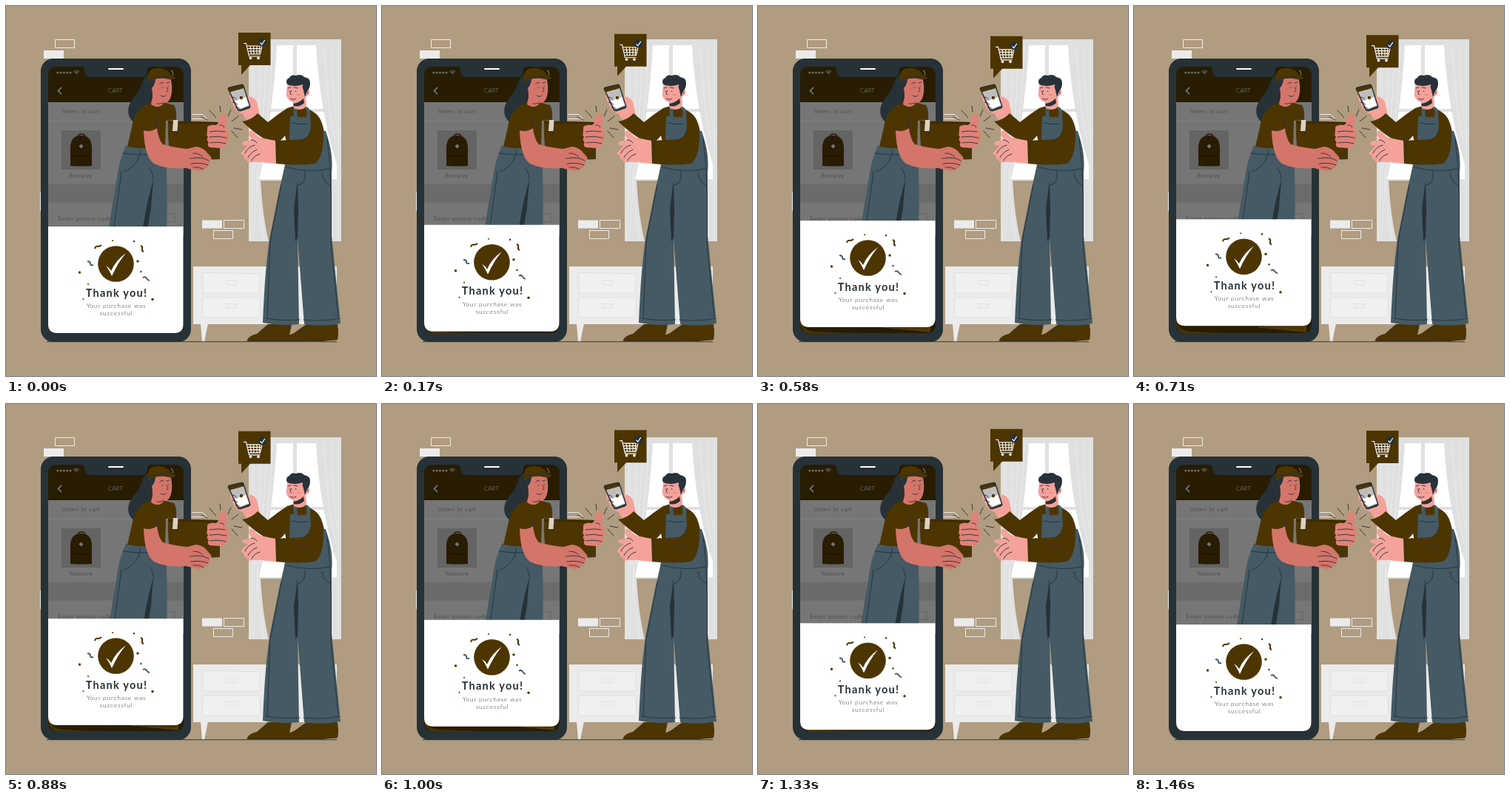
Recreate the animation shown at these times as an HTML page. Size 500 px wide and 500 px high, loop 1.5 s.

```html
<!DOCTYPE html>
<html lang="en">
<head>
<meta charset="utf-8">
<title>Purchase complete</title>
<style>
  html, body { margin: 0; height: 100%; overflow: hidden; background: #b09c80; }
  svg { display: block; width: 100vw; height: 100vh; }
  text { font-family: Lato, "Open Sans", sans-serif; font-weight: 300; fill: #263238; }
  .mid { text-anchor: middle; }
  .dark { fill: #263238; }
  .brown { fill: #4d3502; }
  .shade { fill: #281c02; }
  .denim { fill: #455a64; }
  .pale { fill: #ebebeb; }
  .skin { fill: #d4756a; }
  .pink { fill: #f4a29a; }
  .line { fill: none; stroke: #263238; stroke-width: .9; stroke-linecap: round; stroke-linejoin: round; }
  .light { fill: none; stroke: #ebebeb; stroke-width: 1; }
  .fold { fill: none; stroke: #eee; stroke-width: .8; }
  .trim { fill: #f0f0f0; stroke: #dcdcdc; stroke-width: .8; }
</style>
</head>
<body>
<svg viewBox="0 0 500 500">
  <rect width="500" height="500" fill="#b09c80"/>

  <!-- bricks -->
  <path class="pale" d="M51 60h27v11H51zM265 289.500h27v11h-27z"/>
  <path class="light" d="M66.500 45.500h26v11h-26zM294.500 289.500h27v11h-27zM280.500 303.500h26v11h-26zM251 146.500h15l5 6h-20"/>

  <!-- window -->
  <path fill="#e0e0e0" d="M328 45h125v273h-33V236h-76q3 50 11 82h-27z"/>
  <path fill="#fff" d="M366 53h53q5 90 28 160v21H342q18-80 24-181z"/>
  <path fill="#e0e0e0" d="M388 53h5v181h-5zM357 139h75v4h-75z"/>
  <path class="fold" d="M333 53q4 150-3 264M343 53q1 140-9 264M352 53q-2 110-18 170M360 53q-4 110-20 175 1 50 9 89M430 53q3 80 17 140M440 53q1 80 10 130M449 53v264"/>

  <!-- cabinet -->
  <path class="pale" d="M253 352h194v78H253zM263 429h10l-5 25h-3z"/>
  <path class="trim" d="M265.500 360l78 2-1 26h-76zM266 394h77l1 27h-79zM298 371h13v5.500h-13zM298 402.500h13v5.500h-13z"/>
  <path class="line" d="M55 453.700h392"/>

  <!-- large phone -->
  <rect class="dark" x="47" y="71" width="203" height="383" rx="17"/>
  <path class="light" d="M46.500 252v25"/>
  <path fill="#767676" d="M57 130h183v180H57z"/>
  <path fill="#6b6b6b" d="M57 240.500h183v25H57z"/>
  <path fill="#646464" d="M75 168h53v53H75z"/>
  <path fill="#808080" d="M57 155h183v1H57z"/>
  <path class="shade" d="M57 130V94q0-12 12-12h33q4 0 4 5 1 9 9 9h68q8 0 8-9 0-5 4-5h33q12 0 12 12v36z"/>
  <path d="M139 85h19" stroke="#fff" stroke-width="2" stroke-linecap="round"/>
  <path d="M70 90.200h17" stroke="#757575" stroke-width="2.800" stroke-dasharray="0 4.200" stroke-linecap="round"/>
  <path d="M91.500 89q3.500-3 7 0M93 90.600q2-1.600 4 0M94.800 92h.5M223 87q4 3 2 7" fill="none" stroke="#757575" stroke-width="1.200"/>
  <path d="M75 110l-4.500 4.500 4.500 4.500" fill="none" stroke="#808080" stroke-width="1.500"/>
  <text x="138" y="117.300" font-size="7.500" letter-spacing=".4" style="fill:#999">CART</text>
  <text x="76" y="145" font-size="8" letter-spacing=".75">Items in cart</text>
  <text class="mid" x="101.500" y="232" font-size="8" letter-spacing=".65">Remove</text>
  <text x="70" y="289.500" font-size="8" letter-spacing=".75">Enter promo code</text>
  <path d="M192 280.500h36v11h-36z" fill="none" stroke="#606060" stroke-width=".8"/>
  <path d="M97 177q0-4 5-4t5 4" fill="none" stroke="#281c02" stroke-width="1.500"/>
  <path class="shade" d="M87 216v-26q1-15 14.500-15T116 190v26q-14 1-29 0z"/>
  <path fill="#767676" d="M101.500 186.500l3 3-3 3-3-3z"/>
  <path d="M90 202q11 2 23 0" stroke="#151005" fill="none"/>

  <!-- courier -->
  <path class="dark" d="M194 92c-12 5-9 18-20 30-12 13-12 30 2 37 13 5 27-5 29-23l-2-34z"/>
  <path class="denim" d="M162 189h53Q219 240 217 310H137L150 232Q153 207 162 189z"/>
  <path class="dark" d="M199 234l-8 32-8 44h7l6-38z"/>
  <path class="line" d="M158 199q28 4 57 0M182 195q-2 20-22 29M156 224q-5 38-10 74M194 220q5 6 5 14"/>
  <path class="brown" d="M196 131c-14 3-22 13-26 33l-6 26q25 5 51 1l1-36 14-1q1-15-3-20l-15-4z"/>
  <path class="line" d="M187 166q0 14 3 24M204 165q0-8-4-14"/>
  <path class="skin" d="M197 97l25-2q4 16 1 27-3 10-10 9l-2 3q-8 5-15-1l2-12q-7-3-6-10 2-6 7-2z"/>
  <path class="dark" d="M191 99h11q-1 8-5 12 2 9 0 17l-5-7z"/>
  <path class="brown" d="M192 103q-3-19 13-19 14 0 18 10l6 2q-2 5-9 3-14-4-28 4z"/>
  <path class="line" d="M193 99q13-6 29-3M208 105q3-3 5-1M217 104l4-1M211 110h1M219 109h.5M217 110q4 4 0 6M209 121q4 3 7 0M204 132q6 1 9-2"/>
  <path class="brown" d="M219 156l70 1v50l-66 3q-5-28-4-54z"/>
  <path fill="#402c03" d="M219 155l70 2v3l-70-1z"/>
  <path fill="#d9d2c8" d="M226 154h6.500l-1 15H225z"/>
  <path class="line" d="M277 199h8M279 203h6"/>
  <path class="skin" d="M186 168q10 3 18-3 2 16 8 22 18 5 33 6l12-3q8 1 13 6l6 7q4 4-1 6 2 4-2 6-1 5-6 5-3 4-11 2l-13-3q-27 2-43-6-13-9-14-45z"/>
  <path class="line" d="M253 199q9 0 13 5M249 206q16-3 25 3M250 213q13-2 23 2M253 218q8-1 14 3"/>
  <path fill="#df8278" d="M272 164q2-4 12-3 5-4 5-13 2-4 6-2 4 2 3 10l-2 7q5 4 4 8 2 5-1 8 2 6-2 8-2 6-8 5l-14-1q-4-3-1-7-4-3-1-7-3-3-1-6z"/>
  <path class="line" d="M275 170q12-2 21 0M275 177q12-2 23 1M276 185q12-2 21 1M289 161q4-1 6 3"/>
  <path class="line" d="M264 150l8 4M275 141l9 10M289 135l1 8M304 140l-4 9M314 149l-9 7M308 165l11 2M305 169l8 9"/>

  <!-- customer -->
  <path class="brown" d="M326 453q0-7 13-10l15-13h32l-3 15-4 8zM376 453q1-7 13-11l17-12h42q2 13 0 21l-20 2z"/>
  <path class="line" d="M326 452h50M376 452l70-1M346 438l8 4M350 435l7 4M396 438l8 4M400 435l8 4"/>
  <path class="pink" d="M303 121q-3-5 3-6l8 5 18 3q8 4 8 11l4 16-15 8q-7-6-9-12-11-3-13-12-5-7-4-13z"/>
  <path class="dark" d="M299.500 112q0-2 2-2.500l17-4q2 0 3 2l9 28q0 2-2 3l-12 4q-3 0-4-2z"/>
  <path fill="#bdbdbd" d="M303 116l18-5 8 24-13 5q-2 0-3-2z"/>
  <path class="brown" d="M301 111.500l17-4q2 0 3 3.500l-18 5z"/>
  <path fill="#fff" d="M309 128l15-5 4 11-13 5z"/>
  <circle class="brown" cx="318" cy="124" r="2.200"/>
  <path class="line" d="M305 123q5 0 7 4M306 130q5 0 7 3M310 137q4-1 6 2"/>
  <path class="brown" d="M319 156q13-2 21-11l14 12q12-10 26-19 12-5 21-2 20 6 27 26l4 15-7 35h-40l-8-37q-8 12-18 9-14-4-40-28z"/>
  <path class="denim" d="M384 149h5l-1-12h5l1 13h12q2-9-4-15l6 2q8 10 7 32h17Q443 200 440 225L440 310 452 429Q428 434 403 430L394 314 396 430Q372 433 347 428Q350 350 357 310L370 245Q377 218 383 180z"/>
  <path class="dark" d="M394 236l-5 38 2 44 3-4 1-40z"/>
  <path class="line" d="M386 158q10 3 21 1M379 218q30 8 58 2M434 180q7 50 5 140l10 100M404 224q2 16-9 18M372 242l-15 76-4 103M351 422q22 4 46 2M402 424q25 3 49-2M427 226q2 12 10 16"/>
  <path class="brown" d="M411 141q16 6 18 28 1 33-11 44-25 3-53 0-4-15-2-31l38-2q9-4 11-14z"/>
  <path class="line" d="M412 166q0 10-10 14M368 183q-2 14 0 28M414 196q-8-4-18-4"/>
  <path class="pink" d="M364 182l-15-3q-9-1-13-8-4-4-8-1-2 4 5 11l-12 2q-4 3 0 5l5 1-8 9q-1 4 4 3-2 6 3 6 1 6 6 4 12-1 20 1l14 1z"/>
  <path class="line" d="M331 181q5 0 8 4M336 188q-9 2-13 11M339 194q-9 4-12 11M343 200q-8 2-11 9"/>
  <path class="pink" d="M381 103q10-6 23 0l1 10q6-3 5 4-1 5-5 5l1 13q-6 8-17 3l-1-8q-11-4-9-15z"/>
  <path class="dark" d="M380 106q-3-7 3-9 2-5 9-3 7-3 11 2 8 1 8 8 0 7-4 11l-3 8-2-9q-2-4-1-8-11 4-21 0zM388 132q8-1 14-7l1 6q-7 6-14 4z"/>
  <path class="line" d="M381 111l4-1M389 110l5 1M383 115h1M391 115h1M386 114q-4 5 0 6M384 125q4 3 8 0M406 116q2-1 2 2"/>
  <path fill="none" stroke="#d95f59" stroke-width="2" stroke-linecap="round" opacity=".35" d="M394 120h3"/>

  <!-- speech bubble -->
  <g id="bubble">
    <path class="brown" d="M314 36h43.500v44H330l-12 13V80h-4z"/>
    <path d="M321 50.500h3.500l4 17.500h15M325.500 54H346l-2.500 11H328M326 57.500h19M327 61h17.500M330 54l1.500 11M334.500 54l.5 11M339 54v11M343 54l-1 11" fill="none" stroke="#fff" stroke-width="1.100"/>
    <circle cx="330.500" cy="70.500" r="1.800" fill="#fff"/>
    <circle cx="341" cy="70.500" r="1.800" fill="#fff"/>
    <circle class="dark" cx="346.500" cy="49" r="5.700"/>
    <path d="M343.500 49.500l2.300 2.500 4-6" fill="none" stroke="#fff" stroke-width="1.200"/>
  </g>

  <!-- bottom of the large screen, bared when the card rises -->
  <path class="shade" d="M57 310h183v120q0 12-12 12H69q-12 0-12-12z"/>
  <path class="brown" d="M57 425q0 17 14 17h80q-60 0-82-3-9-3-12-14zM168 433l64 7 1-10z"/>
  <path d="M168 434l64 6v-6" fill="none" stroke="#b09c80" stroke-width=".3"/>

  <!-- thank-you card -->
  <g id="card">
    <path fill="#fff" d="M57 298h182.500v132q0 12-12 12H69q-12 0-12-12z"/>
    <circle class="brown" cx="148.500" cy="348.500" r="24.300"/>
    <path fill="#fff" d="M135 351q4 2 7 7 6-14 20-24-11 13-19 31-4-9-8-14z"/>
    <g fill="none" stroke="#4d3502" stroke-width="2">
      <path d="M120 328q1-4 4-3 3 0 5-2M182 324q3 1 2 4t2 4"/>
      <path stroke="#455a64" d="M110 345q4 0 4 3t4 2M185 367q3-2 5 1t4 3"/>
    </g>
    <g class="brown">
      <circle cx="99.500" cy="360" r="1.700"/>
      <circle cx="144" cy="317" r="1"/>
      <circle cx="173" cy="318" r="1.200"/>
      <circle cx="178" cy="345" r="1.700"/>
      <circle cx="182.500" cy="359" r="1.200"/>
      <circle cx="111" cy="376" r="1"/>
      <circle cx="104.500" cy="396" r="1"/>
      <circle cx="198" cy="396.500" r="1.700"/>
    </g>
    <text class="mid" x="149.500" y="392.500" font-size="14.500" style="font-weight:700" letter-spacing="1.250">Thank you!</text>
    <text class="mid" x="149" y="408" font-size="8.500" letter-spacing=".75">Your purchase was</text>
    <text class="mid" x="149" y="418" font-size="8.500" letter-spacing=".75">successful</text>
  </g>
</svg>
<script>
  const LOOP = 1500, STEPS = 36, LAST = STEPS - 1;
  const cardKeys = [[0, 0], [17.5, -10], [LAST, 0]];
  const bubbleKeys = [[0, 0], [12.5, 5.7], [29.5, -4], [LAST, 0]];
  const card = document.getElementById('card');
  const bubble = document.getElementById('bubble');

  // Linear interpolation between [step, offset] keys
  function offsetAt(keys, step) {
    const i = Math.max(1, keys.findIndex(([at]) => at >= step));
    const [s0, y0] = keys[i - 1], [s1, y1] = keys[i];
    return y0 + (y1 - y0) * (step - s0) / (s1 - s0);
  }

  function shift(node, keys, step) {
    node.setAttribute('transform', `translate(0 ${offsetAt(keys, step).toFixed(2)})`);
  }

  function draw() {
    const time = performance.now() % LOOP;
    const step = Math.min(LAST, Math.floor((time + 4) / LOOP * STEPS));
    shift(card, cardKeys, step);
    shift(bubble, bubbleKeys, step);
    requestAnimationFrame(draw);
  }
  draw();
</script>
</body>
</html>
```
